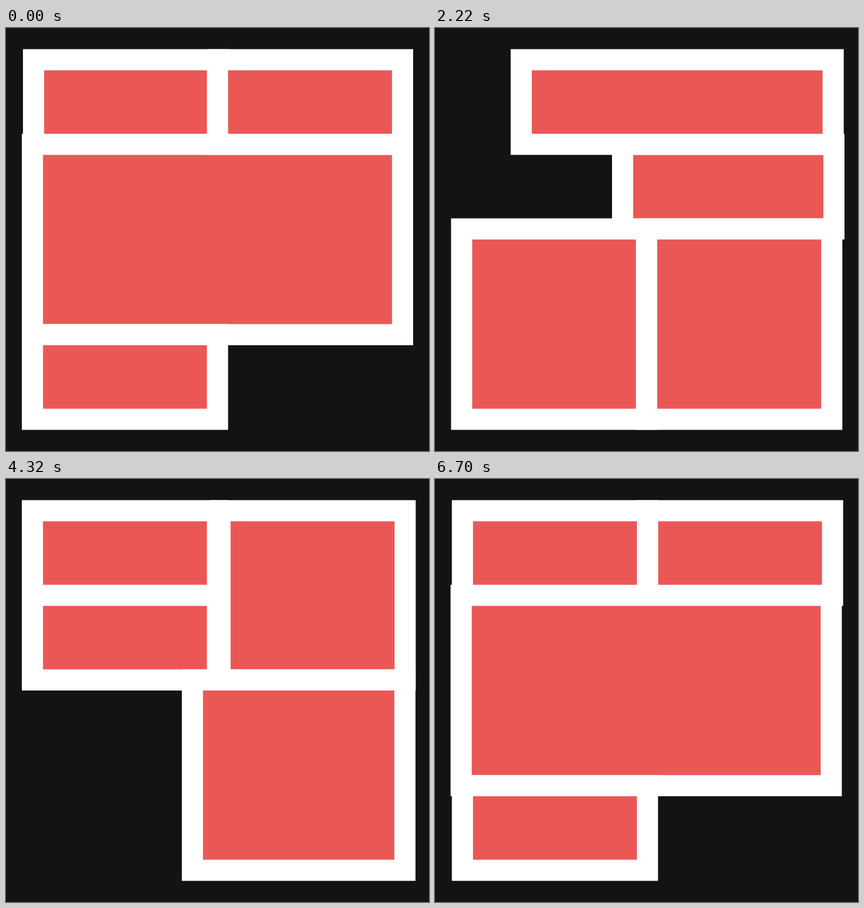
Recreate the animation shown at these times as an HTML page with a canvas. Size 748x748 px, loop 8000 ms.

```html
<!DOCTYPE html>
<html>
<head>
<meta charset="utf-8">
<style>
  html, body { margin: 0; width: 100%; height: 100%; overflow: hidden; background: #131313; }
  canvas { display: block; }
</style>
</head>
<body>
<canvas id="stage" width="748" height="748"></canvas>
<script>
const ctx = document.getElementById('stage').getContext('2d');
const LOOP = 8000;
const UNIT = 37.4; // border width and row unit

// l and r are pixels, t and b are row units; listed from back to front
const start = {
  A: { l: 30, t: 1, r: 394.6, b: 6 },
  C: { l: 28, t: 5, r: 720, b: 15 },
  B: { l: 355.3, t: 1, r: 720, b: 6 },
  D: { l: 28, t: 14, r: 392.7, b: 19 }
};

const wide = { l: 30, r: 722 };
const right = { l: 359.8, r: 724.5 };

// box, start ms, duration ms, edges to reach
const moves = [
  ['D', 0, 240, { r: 721 }],
  ['D', 240, 240, { l: 355.5, r: 720.3 }],
  ['C', 480, 240, { l: 355.5, r: 720.3 }],
  ['A', 720, 240, { b: 19, l: 28.4, r: 393 }],
  ['A', 960, 240, { t: 14 }],
  ['A', 1200, 240, { t: 9 }],
  ['B', 1440, 220, wide],
  ['C', 1640, 200, { b: 10 }],
  ['D', 1640, 200, { t: 9 }],
  ['C', 1840, 200, wide],
  ['C', 2040, 240, right],
  ['B', 2130, 240, right],
  ['A', 2340, 220, { t: 1 }],
  ['A', 2560, 210, { b: 10, l: 28, r: 392.7 }],
  ['D', 2770, 236, wide],
  ['A', 3010, 280, { b: 6 }],
  ['C', 3290, 270, { l: 28 }],
  ['C', 3560, 270, { r: 392.7 }],
  ['B', 3820, 270, { b: 10 }],
  ['D', 4080, 322, right],
  ['C', 4400, 180, { b: 15 }],
  ['D', 4400, 180, { t: 14 }],
  ['D', 4580, 180, wide],
  ['B', 4740, 180, { b: 15 }],
  ['B', 4900, 200, { t: 5 }],
  ['A', 5100, 220, { r: 724.5 }],
  ['A', 5320, 220, { l: 359.8 }],
  ['C', 5540, 240, { t: 1 }],
  ['C', 5800, 300, { b: 6, l: 29.8, r: 394.4 }],
  ['D', 6060, 250, { l: 29.8, r: 394.4 }],
  ['A', 6100, 200, { l: 357, r: 721.7 }],
  ['B', 6300, 250, { l: 27.5, r: 728 }],
  ['B', 6550, 150, { r: 719.4 }]
];

const ease = p => (1 - Math.cos(Math.PI * p)) / 2;

function boxesAt(time) {
  const boxes = {};
  for (const name in start) boxes[name] = { ...start[name] };
  for (const [name, from, duration, edges] of moves) {
    if (time <= from) continue;
    const k = ease(Math.min(1, (time - from) / duration));
    const box = boxes[name];
    for (const edge in edges) box[edge] += (edges[edge] - box[edge]) * k;
  }
  return Object.values(boxes);
}

function drawBox({ l, t, r, b }) {
  const y = t * UNIT, w = r - l, h = (b - t) * UNIT;
  ctx.fillStyle = '#fff';
  ctx.fillRect(l, y, w, h);
  ctx.fillStyle = '#ea5856';
  ctx.fillRect(l + UNIT, y + UNIT, w - 2 * UNIT, h - 2 * UNIT);
}

function frame() {
  ctx.fillStyle = '#131313';
  ctx.fillRect(0, 0, 748, 748);
  boxesAt(performance.now() % LOOP).forEach(drawBox);
  requestAnimationFrame(frame);
}
frame();
</script>
</body>
</html>
```
